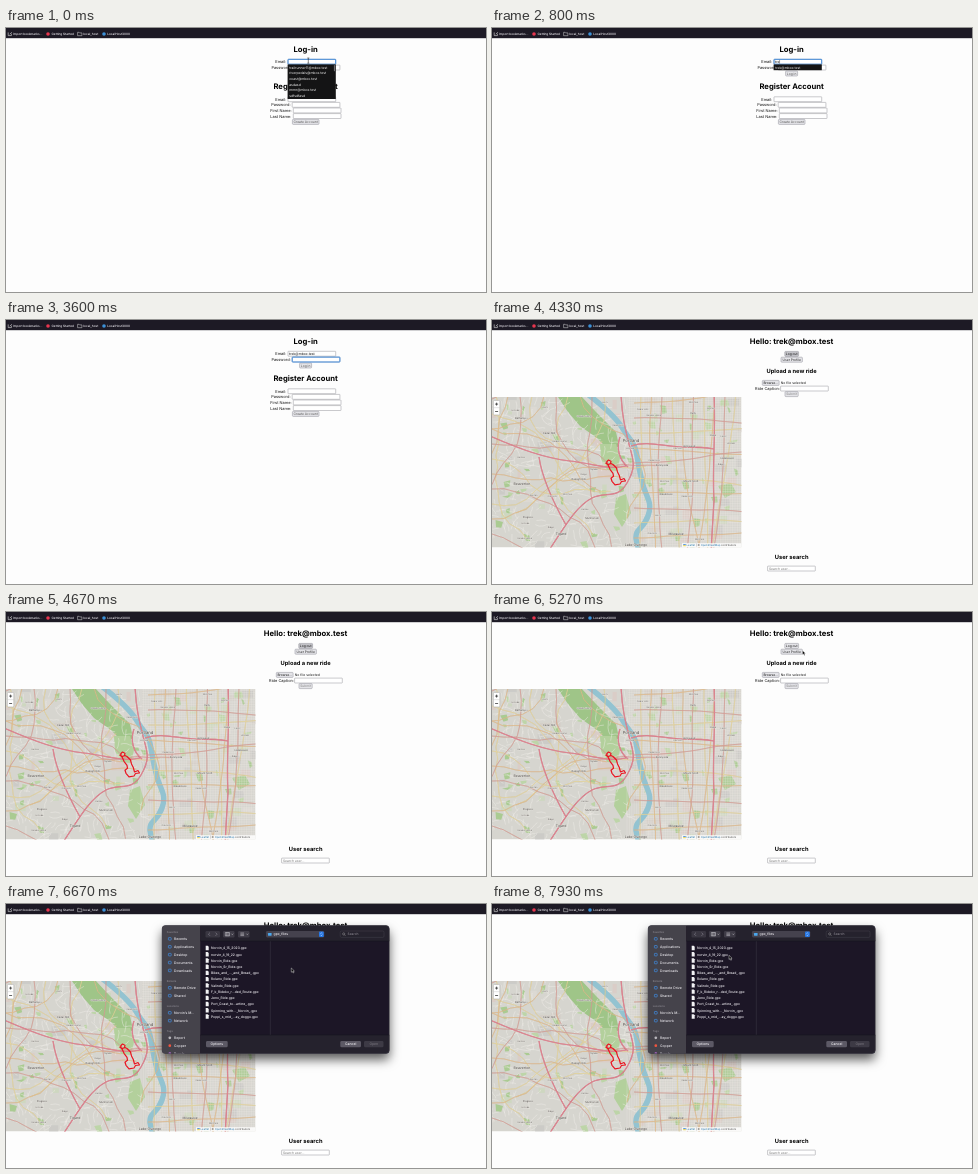
Recreate the animation shown at these times as an HTML page. Size 480x264 px, loop 8 s.

```html
<!DOCTYPE html>
<html lang="en">
<head>
<meta charset="utf-8">
<title>Ride log</title>
<style>
  html, body { margin: 0; width: 100%; height: 100%; overflow: hidden; background: #fdfdfd; }
  svg { display: block; width: 100%; height: 100%; }
  text { font-family: Inter, "Open Sans", sans-serif; white-space: pre; text-rendering: geometricPrecision; }
  #dialogBody text, #bookmarks text { font-weight: 500; }
</style>
</head>
<body>
<svg id="stage" viewBox="0 0 480 264"></svg>
<script>
const LOOP = 8000;
const EMAIL = 'trek@mbox.test';
const KEY_TIMES = [330, 670, 800, 930, 1200, 1400, 1530, 1600, 1730, 1870, 1930, 2000, 2130, 2200];
const SUGGESTIONS = ['trailrunner11@mbox.test', 'riverpedals@mbox.test', 'coast@mbox.test',
  'asdasd', 'mmn@mbox.test', 'sdfsdfasd'];
const FILES = ['Norvin_4_15_2023.gpx', 'norvin_4_19_22.gpx', 'Norvin_Ride.gpx', 'Norvin_Sr_Ride.gpx',
  'Bikes_and_..._and_Bread_.gpx', 'Rolano_Ride.gpx', 'Valindo_Ride.gpx', 'F_k_Rideko_r...ded_Route.gpx',
  'Jeno_Ride.gpx', 'Port_Coast_to...artine_.gpx', 'Spinning_with..._Norvin_.gpx', 'Poppi_s_mid_...ay_doggo.gpx'];

// Drawing helpers, all returning SVG markup.
const text = (x, y, str, size = 3.4, fill = '#151515', attrs = '') =>
  `<text x="${x}" y="${y}" font-size="${size}" fill="${fill}" ${attrs}>${str}</text>`;
const centered = (x, y, str, size, fill, attrs = '') => text(x, y, str, size, fill, `text-anchor="middle" ${attrs}`);
const heading = (y, str, size = 7.65) => centered(299.6, y, str, size, '#000', 'font-weight="700"');
const rect = (x, y, w, h, fill, attrs = '') =>
  `<rect x="${x}" y="${y}" width="${w}" height="${h}" fill="${fill}" ${attrs}/>`;
const circle = (x, y, r, fill) => `<circle cx="${x}" cy="${y}" r="${r}" fill="${fill}"/>`;
const path = (d, stroke, width, fill = 'none', attrs = '') =>
  `<path d="${d}" stroke="${stroke}" stroke-width="${width}" fill="${fill}" stroke-linejoin="round" ${attrs}/>`;
const group = (id, content, attrs = '') => `<g id="${id}" ${attrs}>${content}</g>`;
const field = (x, y, w = 47.7) => rect(x, y, w, 4.9, '#fff', 'stroke="#929299" stroke-width=".5" rx=".4"');
const focusRing = (id, x, y) => rect(x, y, 47.7, 4.9, 'none', `id="${id}" stroke="#2f82dc" stroke-width=".9" rx=".6"`);
const button = (x, y, w, label, color = '#222', id = '') =>
  rect(x, y, w, 5, '#e4e4e8', `${id && `id="${id}"`} stroke="#8f8f98" stroke-width=".5" rx=".8"`) +
  centered(x + w / 2, y + 3.7, label, 3.3, color);
const label = (x, y, str) => text(x, y, str, 3.95);

let seed = 7;
const random = () => (seed = (seed * 16807) % 2147483647) / 2147483647;
const between = (a, b) => a + random() * (b - a);
const repeat = (count, make) => Array.from({ length: count }, (_, i) => make(i)).join('');

function bookmarksBar() {
  return rect(0, 0, 480, 10.2, '#1d1a25') +
    path('M2.2 4.4v3.2h3.2V5.6M3.8 6.2l2-2', '#ddd', .6) + text(7, 7.2, 'Import bookmarks...', 3.05, '#f3f1f6') +
    circle(42, 6, 1.8, '#e8364f') + text(45.5, 7.2, 'Getting Started', 3.1, '#f3f1f6') +
    path('M71.6 4.3h1.5l.5.6h2.3v2.8h-4.3z', '#ddd', .5) + text(77.3, 7.2, 'local_host', 3.1, '#f3f1f6') +
    circle(98, 6, 1.8, '#3c91d8') + text(101.2, 7.2, 'LocalHost3000', 3.1, '#f3f1f6');
}

function loginPage() {
  return heading(23.8, 'Log-in') +
    label(269.3, 35.2, 'Email:') + field(282, 31.3) +
    label(265.4, 41, 'Password:') + field(286.2, 37.1) +
    button(293.6, 43, 12, 'Log in', '#555', 'loginButton') +
    heading(61.4, 'Register Account') +
    label(269.3, 72.8, 'Email:') + field(282, 68.8) +
    label(265.2, 78.3, 'Password:') + field(286.2, 74.4) +
    label(264.3, 84, 'First Name:') + field(287.3, 80) +
    label(264.3, 89.5, 'Last Name:') + field(287.3, 85.6) +
    button(286.4, 91.4, 26.6, 'Create Account', '#555') +
    focusRing('emailFocus', 282, 31.3) + focusRing('passwordFocus', 286.2, 37.1) +
    text(283.1, 35, '', 3.45, '#111', 'id="typed"') +
    text(287.5, 41.2, '••••', 4, '#111', 'id="bullets"') +
    rect(0, 31.9, .35, 3.7, '#111', 'id="caret"') +
    group('dropdown', rect(281.6, 36.4, 48.2, 5.8, '#141415', 'id="dropdownBox"') +
      SUGGESTIONS.map((s, i) => text(283.2, 40.6 + i * 5.67, s, 3.4, '#f4f4f4', 'class="suggestion"')).join('') +
      rect(327.9, 37.2, 1, 6, '#77777b', 'id="scrollThumb"'));
}

function homePage() {
  return heading(23.8, 'Hello: ' + EMAIL) +
    button(292.8, 31.4, 13.8, 'Log out', '#111', 'logoutButton') + button(289, 37.2, 21.4, 'User Profile') +
    heading(53.3, 'Upload a new ride', 5.75) +
    button(270.3, 60.4, 16.8, 'Browse...', '#111', 'browseButton') + text(288.8, 64.1, 'No file selected', 3.4) +
    label(263.1, 69.8, 'Ride Caption:') + field(288.6, 66.1) +
    button(293, 71.6, 13.2, 'Submit', '#888') +
    heading(239.1, 'User search', 5.75) + field(275.6, 246.1) + text(277, 249.8, 'Search user...', 3.3, '#777');
}

function wander(x, y, angle, steps, length, bend = .45) {
  let d = `M${x.toFixed(1)} ${y.toFixed(1)}`;
  for (let i = 0; i < steps; i++) {
    angle += between(-bend, bend);
    d += `l${(Math.cos(angle) * length).toFixed(1)} ${(Math.sin(angle) * length).toFixed(1)}`;
  }
  return d;
}

function mapTiles() {
  const river = 'M94 73C110 85 124 97 131 109S143 122 145 136 148 153 151 165 161 182 156 196 143 208 144 219L147 232';
  const motorways = ['M129 74C130 96 133 108 137 124S145 146 135 163 114 171 100 178 76 201 56 232',
    'M222 74C224 110 220 150 222 180L219 232', 'M139 126C156 120 172 127 190 127S212 127 222 129',
    'M-2 116C28 129 52 138 78 141S116 150 134 146', 'M47 137C50 158 60 180 74 205',
    'M128 117C124 128 127 140 136 147'];
  const parkShape = () => {
    const x = between(0, 246), y = between(78, 226), w = between(2, 8), h = between(2, 7);
    return path(`M${x} ${y}l${w} ${between(-2, 2)} ${between(-2, 2)} ${h} ${-w * .7} ${between(-1, 2)}z`,
      'none', 0, random() < .5 ? '#aacb92' : '#bdd5a8');
  };
  const districts = ['Ridge', 'Garden Home', 'Hillside', 'Kenton', 'Oak Hills', 'Lents', 'Mill Park', 'Cedar Hills'];
  const halo = 'stroke="#e9e7e2" stroke-width=".5" paint-order="stroke"';

  const blocks = repeat(90, i => rect(between(-4, 246), between(75, 226), between(3, 14), between(3, 10),
    ['#dfdcd6', '#c8c8c5', '#d3cdc6', '#cbd9bb', '#dccbc5'][i % 5], 'opacity=".7"'));
  const parks = repeat(75, parkShape);
  const lanes = repeat(260, () =>
    wander(between(0, 138), between(77, 228), Math.floor(random() * 4) * Math.PI / 2, 4, between(1.5, 4)));
  let streets = '';
  for (let x = 135; x < 250; x += 2.4) streets += `M${x} 77V228`;
  for (let y = 78; y < 228; y += 2.4) streets += `M${136 + Math.max(0, y - 150) * .25} ${y}H250`;

  // Three classes of main road share the same grid in the east and the same winding rule in the west.
  const roads = ['', '', ''];
  const addRoad = (i, d) => roads[i % 3] += d;
  for (let i = 0; i < 10; i++) {
    addRoad(i, wander(149 + i * 10.5, 76, Math.PI / 2, 13, 12, .06));
    addRoad(i + 1, wander(142, 83 + i * 15, 0, 10, 11, .06));
    addRoad(i + 2, wander(0, 79 + i * 15, 0, 11, 12));
    addRoad(i, wander(4 + i * 12, 76, Math.PI / 2, 13, 12));
  }
  const roadColors = ['#efdf9c', '#eac08c', '#dc9c98'];

  const places = [[139, 121.5, 'Portland', 4.2], [144, 225.5, 'Lake Oswego', 3.5], [69, 215, 'Tigard', 3.5],
    [30, 165, 'Beaverton', 3.5], [57, 114, 'Cedar Mill', 2.6], [87, 160, 'Raleigh Hills', 2.6],
    [102, 150, 'Sylvan', 2.4], [184, 215, 'Milwaukie', 3.2], [199, 162, 'Mount Scott', 2.6], [197, 127, 'Hollywood', 2.5],
    [201, 94, 'Cully', 2.5], [174, 175, 'Woodstock', 2.5], [28, 99, 'Bethany', 2.6], [100, 199, 'Multnomah', 2.6],
    [36, 198, 'Progress', 2.5], [235, 139, 'Hazelwood', 2.5], [170, 146, 'Sunnyside', 2.5]];

  return blocks + parks +
    path('M66 77L90 77 104 92 124 112 127 126 118 131 105 118 88 106 76 92z', 'none', 0, '#9fc588') +
    path('M108 124L124 124 128 138 125 151 115 150 109 139z', 'none', 0, '#b3d09c') +
    path('M124 178L134 174 139 193 130 207 122 194z', 'none', 0, '#b3d09c') +
    path('M226 166l13-3 5 9-11 6z', 'none', 0, '#adcc96') +
    path(lanes, '#efede8', .45) + path(streets, '#ebe9e4', .42, 'none', 'opacity=".65"') +
    path(river, '#93c3d1', 5.4) +
    roads.map((d, i) => path(d, '#a8917c', .95, 'none', 'opacity=".4"') + path(d, roadColors[i], .65)).join('') +
    motorways.map(d => path(d, '#cf6d7c', 1.25) + path(d, '#e3929c', .7)).join('') +
    repeat(32, i => centered(between(8, 242), between(80, 222), districts[i % districts.length], 2.3, '#6b6763', halo)) +
    places.map(([x, y, name, size]) => centered(x, y, name, size, '#4c4845', halo)).join('');
}

function rideMap() {
  const ride = 'M114.5 142l2-2 2.5 1.2-.5 2.5-3 1-.8-2.6' +
    'M118 143l3 1.5 3.5 3.5 1 4 1.8 3.5 1.2 4.5 3.5-1.5 1.5 2.5-4 .5-1.5 2.5-5 .8-3-3.5-1-3 2.5-2-.5-3-3-4-2-4.5-2.5-2';
  return `<clipPath id="mapClip">${rect(0, 77, 249.5, 150.5, '#000')}</clipPath>` +
    group('map', rect(0, 77, 249.5, 150.5, '#d6d5cf') + group('tiles', mapTiles()) +
      group('ride', path(ride, '#ea1420', 1.2)) +
      rect(1.4, 80.5, 6.4, 14.4, '#fff', 'stroke="#aaa" stroke-width=".5" rx="1"') +
      path('M1.4 87.7h6.4', '#bbb', .4) + path('M3.1 84.1h3M4.6 82.6v3M3.1 91.5h3', '#111', .65) +
      rect(190, 223.2, 59.5, 4.3, '#fff', 'opacity=".85"') +
      rect(191.2, 224.2, 2.6, 1, '#3b83d8') + rect(191.2, 225.2, 2.6, 1, '#f2d43b') +
      text(194.6, 226.4, '<tspan fill="#2878ad">Leaflet</tspan> | © <tspan fill="#2878ad">OpenStreetMap</tspan> contributors', 2.65, '#444'),
      'clip-path="url(#mapClip)"');
}

function fileDialog() {
  const blue = '#3f93f0';
  const frame = (fill, attrs) => rect(156, 21.5, 227.3, 128, fill, `rx="3.5" ${attrs}`);
  const sideTitle = (y, s) => text(160.8, y, s, 2.6, '#8d8a92');
  const sideItem = (y, s, icon) => circle(163.8, y - 1.2, 1.35, icon) + text(168, y, s, 3.4, '#efedf2');
  const place = (y, s) => rect(162.4, y - 2.4, 2.8, 2.5, 'none', `stroke="${blue}" stroke-width=".65" rx=".5"`) +
    text(168, y, s, 3.4, '#efedf2');
  const pill = (x, w, s, fill, color) => rect(x, 137, w, 6.3, fill, 'rx="1.4"') + centered(x + w / 2, 141.4, s, 3.4, color);
  const fileRow = (name, i) => {
    const y = 45.3 + i * 6.23;
    return path(`M199.7 ${y - 3.5}h2l1 1v3.4h-3z`, 'none', 0, '#f2f2f4') + text(205, y, name, 3.35, '#f1eff4');
  };
  return '<filter id="shadow" x="-20%" y="-20%" width="140%" height="150%"><feDropShadow dx="0" dy="6" stdDeviation="5.5" flood-opacity=".65"/></filter>' +
    `<clipPath id="dialogClip">${frame('#000', '')}</clipPath>` +
    frame('#1c1925', 'filter="url(#shadow)"') +
    group('dialogBody',
      rect(156, 21, 38.3, 129, '#45434b') + rect(194.3, 21, 190, 16, '#25222d') + rect(194.3, 131, 190, 19, '#25222d') +
      path('M194.3 37h190M194.3 131h190', '#13111a', .5) + path('M264.3 37.3v93.5', '#3a3742', .6) +
      sideTitle(29.3, 'Favorites') + place(36, 'Recents') + place(43.9, 'Applications') + place(51.8, 'Desktop') +
      place(59.7, 'Documents') + place(67.6, 'Downloads') +
      sideTitle(78.2, 'Remote') + place(84.9, 'Remote Drive') + place(92.8, 'Shared') +
      sideTitle(103.2, 'Locations') + place(109.9, 'Norvin’s M...') + place(117.8, 'Network') +
      sideTitle(128.3, 'Tags') + sideItem(135, 'Report', '#b8b6bc') + sideItem(142.9, 'Copper', '#f0553f') + sideItem(150.8, 'Purple', '#b66ad8') +
      rect(199.5, 27, 14.5, 6.4, '#393641', 'rx="1.2"') + path('M204 28.6l-1.6 1.6 1.6 1.6M209.5 28.6l1.6 1.6-1.6 1.6', '#8d8a94', .6) +
      rect(217, 27, 11.5, 6.4, '#3e3b46', 'rx="1.2"') + path('M219.3 28.5h4.2v3.4h-4.2zM220.7 28.5v3.4M222.1 28.5v3.4M225.4 29.7l.9.9.9-.9', '#dedce2', .5) +
      rect(232, 27, 11.5, 6.4, '#3e3b46', 'rx="1.2"') + path('M234.4 29h3.7M234.4 30.3h3.7M234.4 31.6h3.7M240.4 29.7l.9.9.9-.9', '#dedce2', .5) +
      rect(260, 27, 58.3, 6.4, '#45424e', 'rx="1.3"') + rect(262, 29, 3.6, 2.7, '#4ba7ed', 'rx=".4"') +
      text(267.6, 31.4, 'gpx_files', 3.4, '#f1eff4') + rect(313, 27.5, 4.8, 5.4, '#2476e5', 'rx="1"') +
      path('M314.5 29.7l.9-.9.9.9M314.5 30.8l.9.9.9-.9', '#fff', .5) +
      rect(334.2, 27, 43.8, 6.4, '#25222d', 'rx="1.3" stroke="#4c4954" stroke-width=".4"') +
      `<circle cx="337.7" cy="29.9" r="1.1" fill="none" stroke="#aaa" stroke-width=".45"/>` + path('M338.5 30.8l1 1', '#aaa', .45) +
      text(341.5, 31.4, 'Search', 3.3, '#85828b') +
      FILES.map(fileRow).join('') +
      pill(200, 21.7, 'Options', '#5c5965', '#f5f3f7') + pill(334.3, 20.7, 'Cancel', '#5c5965', '#f5f3f7') + pill(358, 19.5, 'Open', '#3d3a45', '#77747d'),
      'clip-path="url(#dialogClip)"') +
    frame('none', 'stroke="#4b4852" stroke-width=".4"');
}

const stage = document.getElementById('stage');
stage.innerHTML = rect(0, 0, 480, 264, '#fdfdfd') +
  group('login', loginPage()) + group('home', homePage() + rideMap()) + group('dialog', fileDialog()) +
  group('bookmarks', bookmarksBar()) +
  group('beam', path('M-1 -2.6h2M0 -2.6v5.2M-1 2.6h2', '#222', .55)) +
  group('arrow', path('M0 0v4.2l1-.9.8 1.7.8-.4-.8-1.6h1.3z', '#fff', .4, '#000'));

const el = id => document.getElementById(id);
const show = (id, visible) => el(id).setAttribute('visibility', visible ? 'visible' : 'hidden');
const moveTo = (id, [x, y]) => el(id).setAttribute('transform', `translate(${x} ${y})`);
const clamp = v => Math.max(0, Math.min(1, v));
const suggestions = [...document.querySelectorAll('.suggestion')];

// Keys are [time, x, y]; the pointer eases between them.
const POINTER = [[4670, 302, 33], [5000, 316, 38], [5470, 307, 39], [6000, 285.6, 62.8],
  [6330, 285.6, 62.8], [6670, 285.3, 64], [7060, 285.3, 64], [7800, 237, 51.3]];
function pointerAt(t) {
  const next = POINTER.findIndex(key => key[0] > t);
  if (next < 1) return POINTER[next ? POINTER.length - 1 : 0].slice(1);
  const [t0, x0, y0] = POINTER[next - 1], [t1, x1, y1] = POINTER[next];
  const p = (t - t0) / (t1 - t0), k = p * p * (3 - 2 * p);
  return [x0 + (x1 - x0) * k, y0 + (y1 - y0) * k];
}

function drawLogin(t) {
  const inPassword = t >= 3000;
  el('typed').textContent = EMAIL.slice(0, KEY_TIMES.filter(k => t >= k).length);
  show('emailFocus', !inPassword);
  show('passwordFocus', inPassword);
  show('bullets', t >= 3670);
  el('loginButton').setAttribute('fill', t >= 3670 ? '#c4c4ca' : '#e4e4e8');
  el('caret').setAttribute('x', 283.3 + el('typed').getComputedTextLength());
  el('caret').setAttribute('opacity', t >= 330 && t < 2530 ? 1 : 0);
  const rows = t < 400 ? SUGGESTIONS.length : t < 2200 ? 1 : 0;
  el('dropdownBox').setAttribute('height', rows === 1 ? 5.8 : 34.6);
  el('dropdown').setAttribute('display', rows ? 'inline' : 'none');
  const matches = rows === 1 ? [EMAIL] : SUGGESTIONS;
  suggestions.forEach((node, i) => node.textContent = matches[i] || '');
  el('scrollThumb').setAttribute('opacity', rows > 1 ? 1 : 0);
}

function draw(t) {
  const loggedIn = t >= 3870;
  el('login').setAttribute('display', loggedIn ? 'none' : 'inline');
  el('home').setAttribute('display', loggedIn ? 'inline' : 'none');
  el('dialog').setAttribute('display', t >= 6470 ? 'inline' : 'none');
  if (!loggedIn) drawLogin(t);

  el('tiles').setAttribute('opacity', clamp((t - 4070) / 200));
  el('ride').setAttribute('opacity', t >= 4130 ? 1 : 0);
  el('logoutButton').setAttribute('fill', t < 4800 ? '#c2c2c7' : '#e4e4e8');
  el('browseButton').setAttribute('fill', t >= 5870 ? '#b8b8be' : '#e4e4e8');
  show('beam', t < 330);
  moveTo('beam', [302.3, 32.6]);
  show('arrow', t >= 4730);
  moveTo('arrow', pointerAt(t));
}

function tick() {
  draw(performance.now() % LOOP);
  requestAnimationFrame(tick);
}
tick();
</script>
</body>
</html>
```
